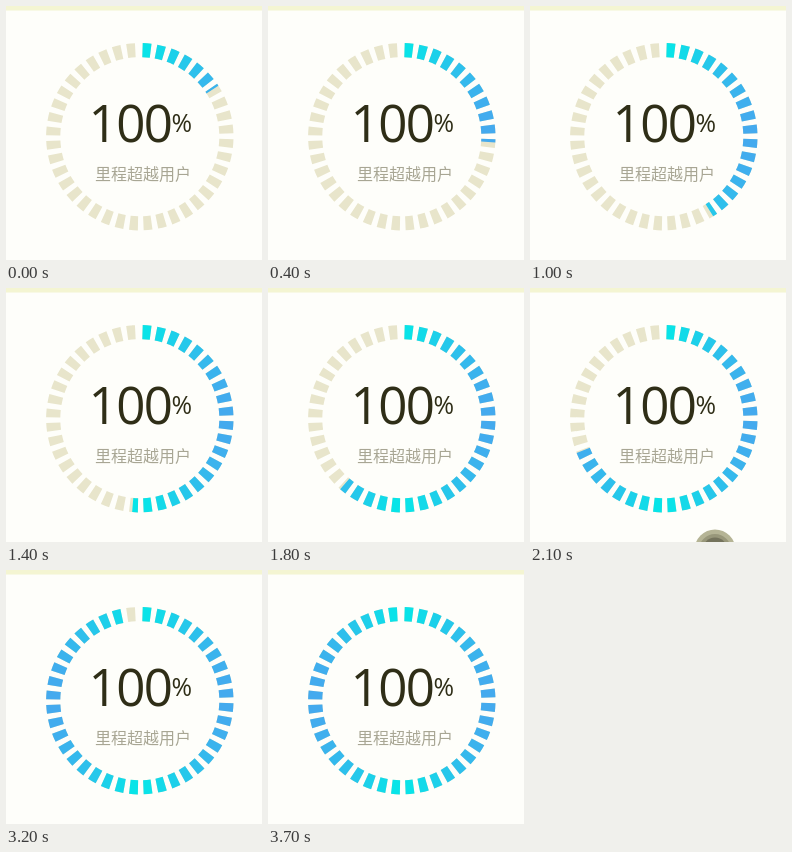
These frames come from a looping animation (256x254 px, 5.6 s). An HTML page:

```html
<!DOCTYPE html>
<html lang="zh">
<head>
<meta charset="utf-8">
<style>
  html, body { margin: 0; width: 100%; height: 100%; overflow: hidden; background: #fefefa; }
  svg { display: block; width: 256px; height: 254px; }
  .value { font-family: "Open Sans", "Noto Sans", sans-serif; fill: #2f2e17; }
  .number { font-size: 51px; letter-spacing: -1.5px; }
  .unit { font-size: 25px; }
  .label { font: 16px "Noto Sans CJK SC", "Noto Sans CJK", sans-serif; fill: #a8a694; }
</style>
</head>
<body>
<svg viewBox="0 0 256 254">
  <rect width="256" height="254" fill="#fefefa"/>
  <rect width="256" height="4.5" fill="#f4f5d2"/>
  <g id="track" fill="#e8e5cb"></g>
  <g id="fill"></g>
  <text class="value number" x="82.5" y="135.5">100</text>
  <text class="value unit" x="165.5" y="126">%</text>
  <text class="label" x="89" y="173.5">里程超越用户</text>
  <g id="touch">
    <circle cx="185" cy="262" r="20.5" fill="#b5b495"/>
    <circle cx="185" cy="262" r="16" fill="#98977a"/>
    <circle cx="185" cy="262" r="12.5" fill="#74735c"/>
  </g>
</svg>
<script>
const LOOP = 5600, STEP = 100;
const CX = 133.8, CY = 130.7, INNER = 79.5, OUTER = 93.7;
const COUNT = 40, PITCH = 8.97, SPAN = 5.4, OFFSET = 1.8;
const START_ANGLE = 57, ANGLE_PER_STEP = 9.12;

const $ = id => document.getElementById(id);
const radians = degrees => degrees * Math.PI / 180;

function point(radius, degrees) {
  const a = radians(degrees);
  return `${(CX + radius * Math.sin(a)).toFixed(2)} ${(CY - radius * Math.cos(a)).toFixed(2)}`;
}

function wedge(from, to) {
  return `M${point(INNER, from)}L${point(OUTER, from)}` +
    `A${OUTER} ${OUTER} 0 0 1 ${point(OUTER, to)}L${point(INNER, to)}` +
    `A${INNER} ${INNER} 0 0 0 ${point(INNER, from)}Z`;
}

// Turquoise at top and bottom, blue at the sides.
function tint(degrees) {
  const k = Math.abs(Math.sin(radians(degrees)));
  const mix = (a, b) => Math.round(a + (b - a) * k);
  return `rgb(${mix(4, 68)},${mix(232, 170)},${mix(232, 238)})`;
}

function addPath(parent) {
  const path = document.createElementNS("http://www.w3.org/2000/svg", "path");
  parent.appendChild(path);
  return path;
}

const segments = Array.from({ length: COUNT }, (_, i) => {
  const from = i * PITCH + OFFSET;
  addPath($("track")).setAttribute("d", wedge(from, from + SPAN));
  const path = addPath($("fill"));
  path.setAttribute("fill", tint(from + SPAN / 2));
  return { from, path };
});

function draw(time) {
  const t = time % LOOP;
  const angle = Math.min(360, START_ANGLE + Math.floor(t / STEP) * ANGLE_PER_STEP);
  for (const { from, path } of segments) {
    const to = Math.min(from + SPAN, angle);
    path.setAttribute("d", to > from ? wedge(from, to) : "");
  }
  $("touch").style.display = t >= 2000 && t < 2300 ? "" : "none";
}

const begin = performance.now();
function tick() {
  draw(performance.now() - begin);
  requestAnimationFrame(tick);
}
tick();
</script>
</body>
</html>
```
